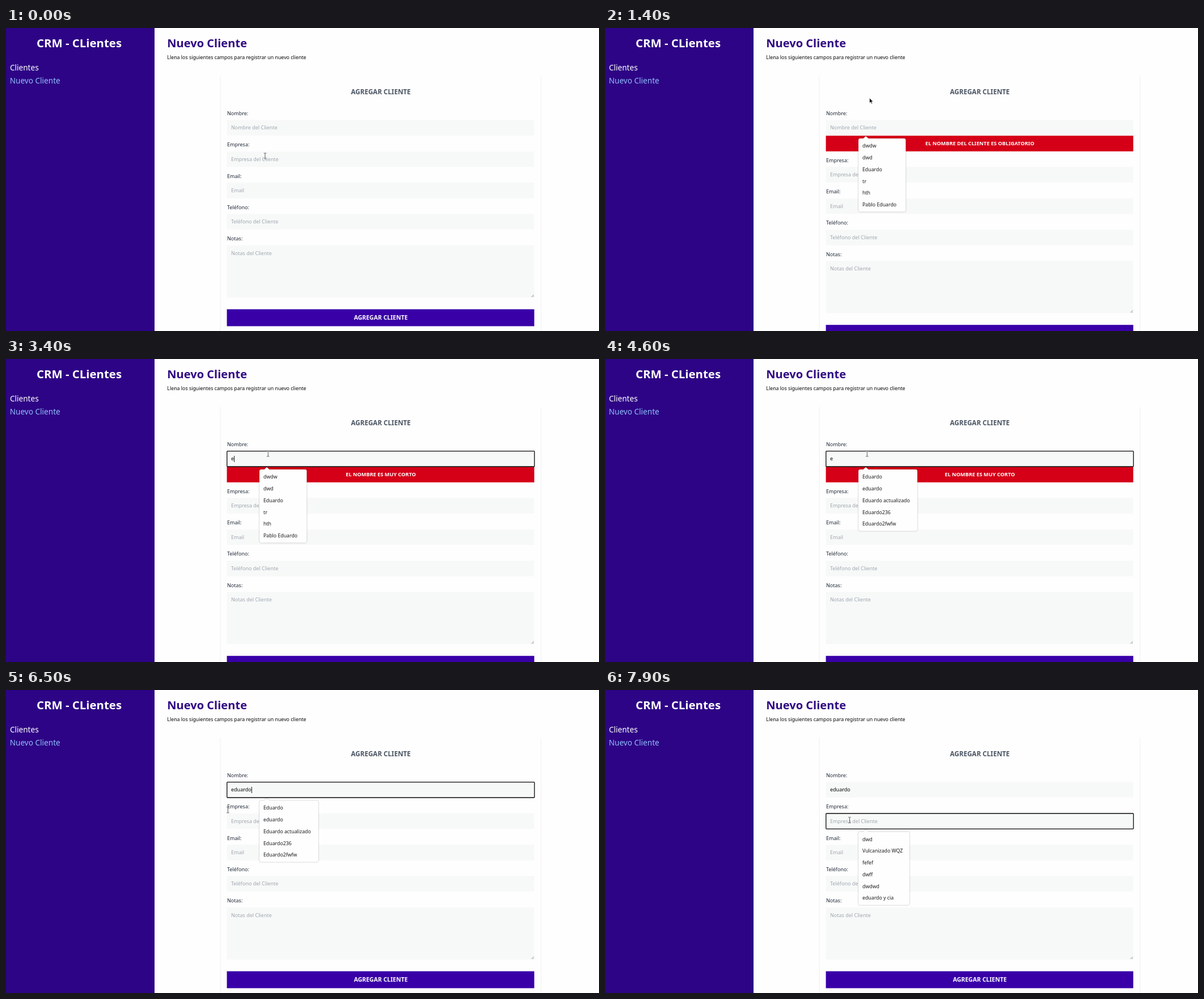
Recreate the animation shown at these times as an HTML page. Size 1046x535 px, loop 8 s.

```html
<!DOCTYPE html>
<html lang="es">
<head>
<meta charset="utf-8">
<title>Nuevo Cliente</title>
<style>
  html, body { margin: 0; width: 100%; height: 100%; overflow: hidden; background: #fefefe; }
  svg { display: block; width: 100%; height: 100%; font: 9px "Noto Sans", sans-serif; }
  .bold { font-weight: 700; }
  .mid { text-anchor: middle; }
  .nav { font-size: 13.6px; fill: #fff; }
  .active { fill: #8fbcfb; }
  .card { fill: #fefefe; filter: drop-shadow(0 2px 1.8px rgba(0, 0, 0, .1)); }
  .label { fill: #1f2937; }
  .hint { fill: #a0a7b0; }
  .field { fill: #f7f9f8; }
  .ring { fill: none; stroke: #08080a; stroke-width: 1.3; }
  .panel { fill: #fefefe; stroke: #000; stroke-opacity: .07; stroke-width: .6;
           filter: drop-shadow(0 .8px .8px rgba(0, 0, 0, .24)); }
  .item { font-size: 8.75px; fill: #1b1b1f; }
  .beam { fill: none; stroke: #444; stroke-width: .9; }
  .halo { stroke: #fff; stroke-width: 2; stroke-opacity: .6; }
</style>
</head>
<body>
<svg viewBox="0 0 1046 535">
  <defs><path id="beamShape" d="M-2.3-5H-.6L0-4.5.6-5H2.3M0-4.5V4.5M-2.3 5H-.6L0 4.5.6 5H2.3"/></defs>

  <rect width="262" height="535" fill="#2d0485"/>
  <text class="bold mid" x="129" y="34" font-size="20.4" fill="#fff">CRM - CLientes</text>
  <text class="nav" x="6.9" y="75">Clientes</text>
  <text class="nav active" x="6.7" y="98">Nuevo Cliente</text>

  <text class="bold" x="284.2" y="34" font-size="20.1" fill="#310a83">Nuevo Cliente</text>
  <text x="284.3" y="54.8" font-size="8.82" fill="#060606">Llena los siguientes campos para registrar un nuevo cliente</text>

  <rect class="card" x="379" y="82" width="564" height="500" rx="2"/>
  <text class="bold mid" x="661.2" y="117" font-size="11.65" fill="#4b5563">AGREGAR CLIENTE</text>

  <g id="first"></g>
  <g id="error">
    <rect x="389.6" y="190.2" width="542.2" height="27.6" fill="#d50017"/>
    <text id="errorText" class="bold mid" x="661.2" y="207" font-size="9.2" fill="#fff"></text>
  </g>
  <g id="rest">
    <path d="M926.8 475 931 470.8M929.4 475 931 473.4" stroke="#777" stroke-width=".8"/>
    <rect x="389.6" y="496.6" width="542.2" height="29.9" fill="#3900a8"/>
    <text class="bold mid" x="661.2" y="515.3" font-size="10.5" fill="#fff">AGREGAR CLIENTE</text>
  </g>

  <text id="typed" x="397" y="179.4" fill="#050505"></text>
  <g id="focus">
    <rect class="ring" x="389.8" y="162.7" width="542.4" height="27.3" rx="1"/>
    <rect id="caret" y="171" width=".9" height="11"/>
  </g>
  <g id="popup"></g>

  <g id="beam" class="beam"><use href="#beamShape" class="halo"/><use href="#beamShape"/></g>
  <path id="arrow" d="M0 0V9.2L2.1 7.3 3.6 10.6 5.1 9.9 3.7 6.8H6.5Z" fill="#111" stroke="#fff" stroke-width=".7"/>
</svg>
<script>
const LOOP = 8000, FRAME = 100, BLINK = 600, FADE = 400;
const TOP = 162.5, PITCH = 55.3, FIELD = 27.6, ROW = 20.75;
const NAME = 'eduardo';
const $ = id => document.getElementById(id);
const show = (el, on) => el.setAttribute('visibility', on ? 'inherit' : 'hidden');
const move = (el, x, y) => el.setAttribute('transform', `translate(${x} ${y})`);
const easeOut = u => 1 - (1 - Math.min(Math.max(u, 0), 1)) ** 4;

const all = { width: 83.5, items: ['dwdw', 'dwd', 'Eduardo', 'tr', 'hth', 'Pablo Eduardo'] };
const matches = { width: 104, items: ['Eduardo', 'eduardo', 'Eduardo actualizado', 'Eduardo236', 'Eduardo2fwfw'] };
const companies = { width: 90, row: 1, items: ['dwd', 'Vulcanizado WQZ', 'fefef', 'dwff', 'dwdwd', 'eduardo y cia'] };

const required = 'EL NOMBRE DEL CLIENTE ES OBLIGATORIO', tooShort = 'EL NOMBRE ES MUY CORTO';

// A scene with a list has focus; without one, the previous list fades away.
const scenes = [
  { start: 0 },
  { start: 600, list: all },
  { start: 1400, error: required },
  { start: 2600, list: all, error: required },
  { start: 3400, list: all, error: tooShort },
  { start: 3700, list: matches, error: tooShort },
  { start: 5100, list: matches },
  { start: 6800 },
  { start: 7200, list: companies }
];

const home = { x: 457, y: 226 };
const moves = [
  { start: 0, time: 400, x: 450, y: 171 },
  { start: 1200, time: 100, x: 466.5, y: 123.5 },
  { start: 2000, time: 300, x: 462.3, y: 167 },
  { start: 6400, time: 300, x: 374, y: 223 },
  { start: 7100, time: 100, x: 431.5, y: 229.7 }
];

function pointerAt(t) {
  return moves.reduce((from, to) => {
    const u = easeOut((t - to.start) / to.time);
    return { x: from.x + (to.x - from.x) * u, y: from.y + (to.y - from.y) * u };
  }, home);
}

function lettersAt(t) {
  if (t < 3400) return 0;
  return t < 5100 ? 1 : 3 + Math.floor(4 * easeOut((t - 5100) / 700));
}

function field(index, label, hint, height = FIELD) {
  const y = TOP + index * PITCH;
  return `<text class="label" x="390" y="${y - 8.6}">${label}:</text>
    <rect class="field" x="389.6" y="${y}" width="542.2" height="${height}"/>
    <text class="hint" x="397" y="${y + 16.9}">${hint}</text>`;
}

$('first').innerHTML = field(0, 'Nombre', 'Nombre del Cliente');
$('rest').insertAdjacentHTML('afterbegin',
  field(1, 'Empresa', 'Empresa del Cliente') + field(2, 'Email', 'Email') +
  field(3, 'Teléfono', 'Teléfono del Cliente') + field(4, 'Notas', 'Notas del Cliente', 92.2));
const nameHint = $('first').querySelector('.hint');

let shownList;
function drawPopup(list, opacity) {
  const popup = $('popup');
  show(popup, list && opacity);
  if (!list) return;
  const { width, items, row = 0 } = list;
  const top = 195 + row * PITCH, height = items.length * ROW + 5;
  if (list !== shownList) {
    shownList = list;
    popup.innerHTML = `<path class="panel" d="M450 ${top}H455.5L460 ${top - 4}L464.5 ${top}H${444 + width}
      q3 0 3 3v${height - 6}q0 3-3 3H450q-3 0-3-3v${6 - height}q0-3 3-3Z"/>` +
      items.map((item, i) => `<text class="item" x="454" y="${top + 16.3 + i * ROW}">${item}</text>`).join('');
  }
  const scale = .95 + .05 * opacity, cx = 447 + width / 2, cy = top + height / 2;
  popup.setAttribute('opacity', opacity);
  popup.setAttribute('transform', `translate(${cx} ${cy}) scale(${scale}) translate(${-cx} ${-cy})`);
}

function draw(t) {
  const index = scenes.findLastIndex(scene => scene.start <= t);
  const { start, list, error = '' } = scenes[index], age = t - start;

  show($('error'), error);
  $('errorText').textContent = error;
  move($('rest'), 0, error ? FIELD : 0);

  const letters = lettersAt(t);
  $('typed').textContent = NAME.slice(0, letters);
  show(nameHint, !letters);

  const row = list?.row || 0;
  show($('focus'), list);
  move($('focus'), 0, row * PITCH);
  show($('caret'), Math.floor(age / BLINK) % 2 === 0);
  $('caret').setAttribute('x', 397.2 + (letters && !row ? $('typed').getComputedTextLength() : 0));

  drawPopup(list || scenes[index - 1]?.list, list ? 1 : 1 - easeOut(age / FADE));

  const { x, y } = pointerAt(t), aboveFields = y < TOP;
  show($('arrow'), aboveFields);
  show($('beam'), !aboveFields);
  move($(aboveFields ? 'arrow' : 'beam'), x, y);
}

const begin = performance.now();
function tick() {
  const t = (performance.now() - begin) % LOOP;
  draw(Math.floor(t / FRAME) * FRAME);
  requestAnimationFrame(tick);
}
tick();
</script>
</body>
</html>
```
